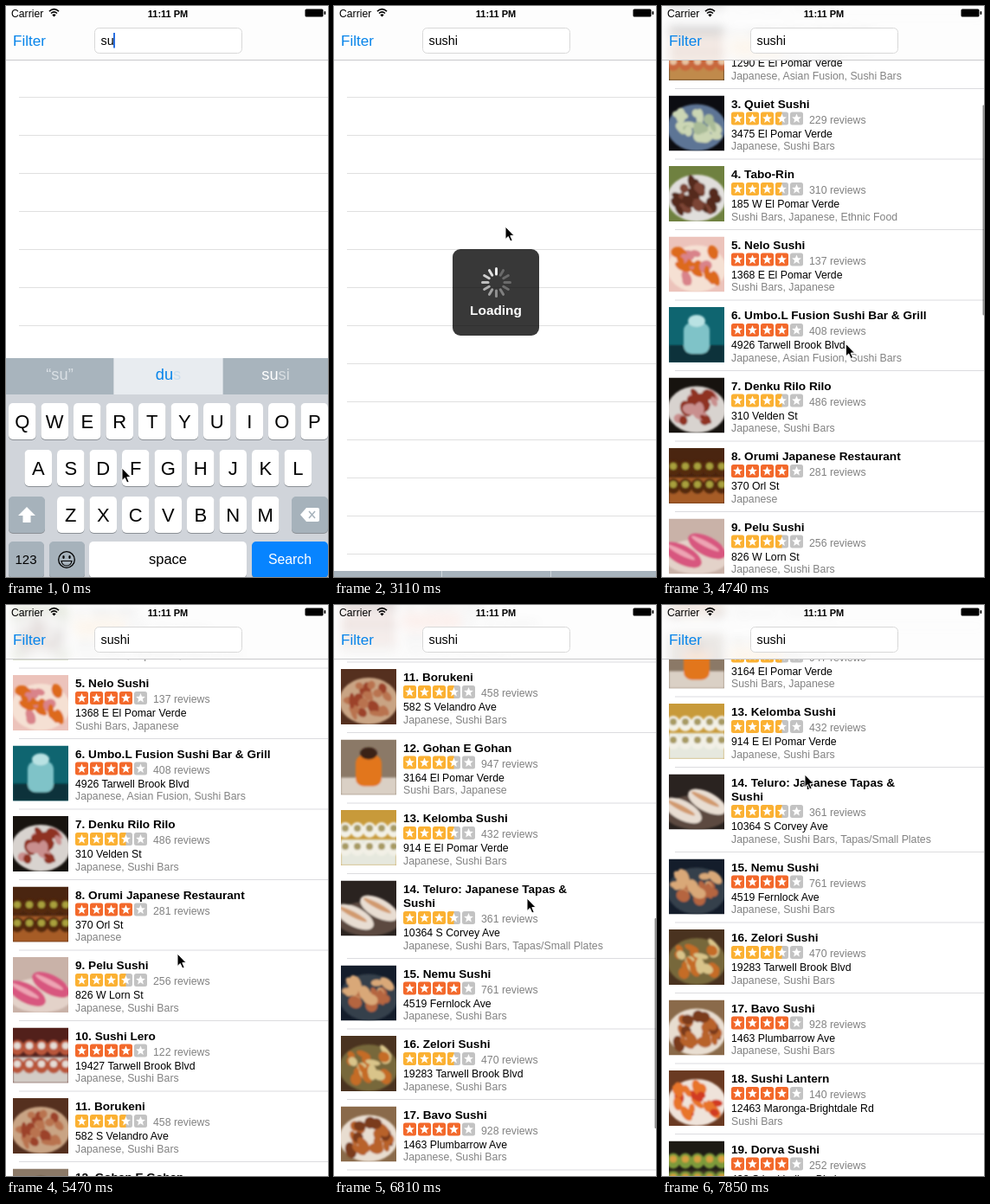
Animation, 372 px wide and 660 px high, one loop 7.99 s. Source, as an HTML page:

```html
<!DOCTYPE html>
<html lang="en">
<head>
<meta charset="utf-8">
<title>Sushi search</title>
<style>
html, body { margin: 0; width: 100%; height: 100%; overflow: hidden; background: #fff; }
svg { display: block; }
text { font-family: "Liberation Sans", Arial, sans-serif; white-space: pre; }
.title { font-size: 13.6px; font-weight: bold; }
.body { font-size: 12.3px; }
.gray { fill: #828282; }
.mid { text-anchor: middle; }
.key { font-size: 22px; }
.hint { font-size: 18.3px; }
</style>
</head>
<body>
<svg id="stage" width="372" height="660" viewBox="0 0 372 660"></svg>
<script>
const LOOP = 7990, STEP = LOOP / 54;
const BLUE = '#0784ea', KEY_GRAY = '#a6b2bb';

// title (/ breaks the line) | stars | reviews | address | categories | photo layout | photo colours
const rows = `Sushi Nemu|4|1316|482 W Lorn St|Sushi Bars, Japanese|heap|#1c2a36 #31505c #e99c88 #f3dcd4
Amber Fern Sushi Club|3.5|1003|1290 E El Pomar Verde|Japanese, Asian Fusion, Sushi Bars|rolls|#1b1512 #c08a4c #c9683c #e8c3a0
Quiet Sushi|3.5|229|3475 El Pomar Verde|Japanese, Sushi Bars|heap|#0c0d12 #5d7595 #cbd6b4 #a9bb98
Tabo-Rin|3.5|310|185 W El Pomar Verde|Sushi Bars, Japanese, Ethnic Food|heap|#6f8140 #e0dedb #54291f #7b4434
Nelo Sushi|4|137|1368 E El Pomar Verde|Sushi Bars, Japanese|heap|#ecc3bb #f5e0d3 #dd6a1e #d9838a
Umbo.L Fusion Sushi Bar &amp; Grill|4|408|4926 Tarwell Brook Blvd|Japanese, Asian Fusion, Sushi Bars|tower|#0f6570 #08333b #7fc3c8 #b9e2e3
Denku Rilo Rilo|3.5|486|310 Velden St|Japanese, Sushi Bars|heap|#17130f #d8d3cf #8f3322 #c98f8e
Orumi Japanese Restaurant|4|281|370 Orl St|Japanese|rolls|#4a2510 #a65c28 #552a10 #a9a13c
Pelu Sushi|3.5|256|826 W Lorn St|Japanese, Sushi Bars|slabs|#c9b2a8 #e3d2c9 #d8577f #eda4b4
Sushi Lero|4|122|19427 Tarwell Brook Blvd|Japanese, Sushi Bars|rolls|#52201b #d3ccc6 #b9563a #e5ddd6
Borukeni|3.5|458|582 S Velandro Ave|Japanese, Sushi Bars|heap|#55301f #c9a484 #b9734f #9c4229
Gohan E Gohan|3.5|947|3164 El Pomar Verde|Sushi Bars, Japanese|tower|#8b7967 #dad0c5 #e2761f #3a2418
Kelomba Sushi|3.5|432|914 E El Pomar Verde|Japanese, Sushi Bars|rolls|#c89a3a #e6e8de #f2f0e6 #a79a62
Teluro: Japanese Tapas &amp;/Sushi|3.5|361|10364 S Corvey Ave|Japanese, Sushi Bars, Tapas/Small Plates|slabs|#2a2320 #5b4a40 #e8ddd2 #d19a6e
Nemu Sushi|4|761|4519 Fernlock Ave|Japanese, Sushi Bars|heap|#141d2b #34404c #d9a878 #b5653f
Zelori Sushi|3.5|470|19283 Tarwell Brook Blvd|Japanese, Sushi Bars|heap|#4a3320 #77683a #c56c27 #d9c48a
Bavo Sushi|4|928|1463 Plumbarrow Ave|Japanese, Sushi Bars|heap|#8a6a4a #e8ddd0 #b8622a #7a3a1c
Sushi Lantern|4|140|12463 Maronga-Brightdale Rd|Sushi Bars|heap|#6a3a22 #efe3da #e8742a #d13a22
Dorva Sushi|4|252|428 S Larkhollow Blvd|Japanese, Sushi Bars|rolls|#1d1a14 #3d3524 #7d9a3a #d8a040`
  .split('\n').map(line => line.split('|'));

const range = n => [...Array(n).keys()];
const clamp = v => Math.max(0, Math.min(1, v));
const progress = (t, from, to) => clamp((t - from) / (to - from));
const text = (x, y, str, cls = '', attrs = '') => `<text x="${x}" y="${y}" class="${cls}" ${attrs}>${str}</text>`;
const rect = (x, y, w, h, fill, rx = 0, attrs = '') =>
  `<rect x="${x}" y="${y}" width="${w}" height="${h}" fill="${fill}" rx="${rx}" ${attrs}/>`;
const ellipse = (x, y, rx, ry, fill, turn = 0) =>
  `<ellipse cx="${x}" cy="${y}" rx="${rx}" ry="${ry}" fill="${fill}" transform="rotate(${turn} ${x} ${y})"/>`;
const path = (d, fill, attrs = '') => `<path d="${d}" fill="${fill}" ${attrs}/>`;

function random(seed) {
  return () => (seed = (seed * 16807) % 2147483647) / 2147483647;
}

const layouts = {
  heap: ([, a, b, c], rnd) => ellipse(32, 37, 34, 27, a) + range(22).map(i =>
    ellipse(9 + rnd() * 46, 18 + rnd() * 34, 4 + rnd() * 6, 3 + rnd() * 4, i % 3 ? b : c, rnd() * 90)).join(''),
  rolls: ([, a, b, c]) => rect(0, 34, 64, 30, a) + range(10).map(i => {
    const x = 5 + (i % 5) * 14, y = 23 + Math.floor(i / 5) * 21;
    return ellipse(x, y, 8, 9, b) + ellipse(x, y - 2, 4, 4, c);
  }).join(''),
  slabs: ([, a, b, c]) => ellipse(32, 44, 38, 20, a) + [[16, 42], [44, 32]].map(([x, y]) =>
    ellipse(x, y, 24, 11, b, 28) + ellipse(x - 2, y - 3, 18, 3, c, 28)).join(''),
  tower: ([, a, b, c]) => rect(0, 44, 64, 20, a) + rect(17, 18, 30, 36, b, 9) + ellipse(32, 16, 10, 7, c)
};

function photo(index, kind, colors) {
  const rnd = random(index * 7919 + 101);
  return `<svg x="8" y="8" width="64" height="64">${rect(0, 0, 64, 64, colors[0])}` +
    `<g filter="url(#soft)">${layouts[kind](colors, rnd)}</g></svg>`;
}

const starPath = range(10).map(i => {
  const r = i % 2 ? 2.5 : 5.7, a = i * Math.PI / 5;
  return `${i ? 'L' : 'M'}${(7.5 + r * Math.sin(a)).toFixed(2)} ${(7.8 - r * Math.cos(a)).toFixed(2)}`;
}).join('') + 'Z';

function stars(score, y) {
  const color = score === 4 ? '#f3692b' : '#fbb133';
  return range(5).map(i => `<g transform="translate(${80 + i * 17} ${y})">` +
    rect(0, 0, 15, 15, i + 1 <= score ? color : '#c3c3c3', 2.5) +
    (score - i === .5 ? path('M7.5 0H2.5Q0 0 0 2.5V12.5Q0 15 2.5 15H7.5Z', color) : '') +
    path(starPath, '#fff') + '</g>').join('');
}

function listMarkup() {
  let top = 62;
  return rows.map(([title, score, reviews, address, kinds, layout, colors], i) => {
    const lines = title.split('/'), dy = (lines.length - 1) * 16.5;
    const group = `<g transform="translate(0 ${top})">` + photo(i, layout, colors.split(' ')) +
      lines.map((line, n) => text(80, 22 + n * 16, (n ? '' : `${i + 1}. `) + line, 'title')).join('') +
      stars(+score, 27 + dy) +
      text(170, 40 + dy, `${reviews} reviews`, 'body gray') +
      text(80, 56 + dy, address, 'body') +
      text(80, 70.5 + dy, kinds, 'body gray') +
      rect(15, 81 + dy, 357, 1, '#dcdcdf') + '</g>';
    top += 81.5 + dy;
    return group;
  }).join('');
}

function navMarkup() {
  return rect(0, 0, 372, 62, '#fdfdfd') +
    '<g clip-path="url(#navArea)"><g filter="url(#frost)" opacity=".16"><use href="#list"/></g></g>' +
    rect(0, 62, 372, 1, '#c9c9cb') +
    text(6, 12.5, 'Carrier', '', 'font-size="12.2"') +
    text(187, 12.5, '11:11 PM', 'mid', 'font-size="11" font-weight="bold"') +
    path('M50 6.2Q55.5 1 61 6.2M52 8.5Q55.5 5.3 59 8.5', 'none', 'stroke="#000" stroke-width="1.6"') +
    path('M53.3 10.2Q55.5 8.3 57.7 10.2L55.5 12.5Z', '#000') +
    rect(345.5, 3.5, 21, 9, '#000', 1.5) + rect(367.5, 6, 1.8, 4, '#000', 1) +
    text(8, 46, 'Filter', '', `font-size="17.1" fill="${BLUE}"`) +
    rect(102.5, 25.5, 170, 29, '#fff', 5, 'stroke="#d8d8d8"') +
    text(109.5, 45, '', '', 'id="query" font-size="14.3"') +
    rect(124, 31, 2, 17.5, '#2a6fe0', 0, 'id="caret"');
}

function keyBox(x, y, w, fill = '#fff') {
  return rect(x, y + 1, w, 42, '#8b9096', 5) + rect(x, y, w, 42, fill, 5);
}

function keyboardMarkup() {
  const letters = [['QWERTYUIOP', 3, 459], ['ASDFGHJKL', 21.5, 513], ['ZXCVBNM', 59, 567]].map(([keys, x0, y]) =>
    [...keys].map((k, i) => keyBox(x0 + i * 37.5, y, 31.5) +
      text(x0 + i * 37.5 + 15.75, y + 29, k, 'key mid')).join('')).join('');
  return rect(0, 407, 372, 253, '#d0d4da') + rect(0, 407, 372, 42, '#a8b4bd') +
    rect(124, 407, 127, 42, '#e8ecf0', 0, 'id="highlight"') +
    rect(124, 407, 1, 42, '#d0d7dc') + rect(250, 407, 1, 42, '#d0d7dc') +
    text(62, 432, '', 'hint mid', 'id="hint0" fill="#d9dfe4"') +
    text(187.5, 432, '', 'hint mid', `id="hint1" fill="${BLUE}"`) +
    text(311.5, 432, '', 'hint mid', 'id="hint2" fill="#fff"') + letters +
    keyBox(3, 567, 42, KEY_GRAY) + path('M24 579L34 589H28.5V597H19.5V589H14Z', '#fff') +
    keyBox(330, 567, 42, KEY_GRAY) +
    path('M340 588L347 580H360Q362 580 362 582V594Q362 596 360 596H347Z', '#fff') +
    path('M350 584L357 592M357 584L350 592', 'none', `stroke="${KEY_GRAY}" stroke-width="1.5"`) +
    keyBox(3, 619, 41, KEY_GRAY) + text(23, 645, '123', 'mid', 'font-size="15"') +
    keyBox(50, 619, 41, KEY_GRAY) +
    '<circle cx="70" cy="640" r="9.3" fill="none" stroke="#000" stroke-width="1.3"/>' +
    ellipse(66.5, 637, 1.2, 2, '#000') + ellipse(73.5, 637, 1.2, 2, '#000') +
    path('M64 641.5H76Q75 647 70 647T64 641.5Z', 'none', 'stroke="#000" stroke-width="1.2"') +
    keyBox(96, 619, 182) + text(187, 645, 'space', 'mid', 'font-size="16.5"') +
    keyBox(284, 619, 88, '#0784ff') + text(328, 645, 'Search', 'mid', 'font-size="15.8" fill="#fff"');
}

function hudMarkup() {
  return rect(137, 281, 100, 100, '#000', 9, 'opacity=".78"') +
    range(12).map(i => rect(186, 302, 3, 9.5, '#fff', 1.5, `class="spoke" transform="rotate(${i * 30} 187.5 319.5)"`)).join('') +
    text(187, 357, 'Loading', 'mid', 'font-size="15.4" font-weight="bold" fill="#fff"');
}

const defs = `<defs><clipPath id="navArea">${rect(0, 0, 372, 62, '#000')}</clipPath>
  <filter id="frost" filterUnits="userSpaceOnUse" x="-30" y="-30" width="432" height="122"><feGaussianBlur stdDeviation="6"/></filter>
  <filter id="soft"><feGaussianBlur stdDeviation=".9"/></filter></defs>`;

document.getElementById('stage').innerHTML = defs + rect(0, 0, 372, 660, '#fff') +
  `<g id="empty">${range(13).map(i => rect(15, 105 + i * 44, 357, 1, '#e0e0e0')).join('')}</g>` +
  `<g id="list">${listMarkup()}</g><g>${navMarkup()}</g>` +
  rect(370.5, 0, 3, 243, '#000', 1, 'id="bar"') +
  `<g id="hud">${hudMarkup()}</g><g id="keyboard">${keyboardMarkup()}</g><g id="pointer">` +
  path('M0 0V14.5L3.3 11.5 5.8 17 8.2 16 5.8 10.6H10.2Z', '#000', 'stroke="#fff" stroke-width="1"') + '</g>';

const $ = id => document.getElementById(id);
const spokes = document.querySelectorAll('.spoke');

// start time, query, caret x, suggestions as [settled, fading in]
const typing = [
  [0, 'su', 124, ['“su”', ''], ['du', 's'], ['su', 'si']],
  [440, 'sus', 131, ['“sus”', ''], ['us', ''], ['susi', '']],
  [740, 'sush', 139, ['“sush”', ''], ['such', ''], ['sushi', '']],
  [1030, 'sushi', 142, ['“sushi”', ''], ['', ''], ['', '']]
];

const pointerPath = [
  [0, 134, 534], [1190, 136, 541], [1780, 163, 253], [2370, 352, 553], [2560, 340, 630], [2680, 340, 630],
  [3110, 198, 255], [3600, 203, 285], [4295, 219, 452], [4650, 217, 455], [4850, 206, 300], [5478, 198, 403],
  [5600, 202, 415], [5850, 214, 250], [6050, 218, 265], [6360, 223, 357], [6514, 223, 357], [6810, 223, 339],
  [7350, 222, 222], [7702, 203, 224], [7846, 165, 196]
];

// from, to, distance, easing power
const scrolls = [[4650, 5200, 315, 3], [5600, 5950, 477, 2], [6540, 6810, 19, 1], [6810, 7350, 123, 2]];

function pointerAt(t) {
  const next = pointerPath.findIndex(p => p[0] > t);
  if (next < 0) return pointerPath.at(-1).slice(1);
  const [a, b] = [pointerPath[next - 1], pointerPath[next]];
  const p = progress(t, a[0], b[0]), eased = p * p * (3 - 2 * p);
  return [1, 2].map(k => a[k] + (b[k] - a[k]) * eased);
}

const scrollAt = t => Math.round(2 * scrolls.reduce((sum, [from, to, distance, power]) =>
  sum + distance * (1 - (1 - progress(t, from, to)) ** power), 0)) / 2;

const barAt = t => Math.max(...scrolls.map(([from, to]) => t < from ? 0 : 1 - progress(t, to + 20, to + 260)));

function render(t) {
  const [, query, caretX, ...hints] = typing.findLast(s => s[0] <= t);
  $('query').textContent = query;
  $('caret').setAttribute('x', caretX);
  $('caret').setAttribute('opacity', t < 2700 ? 1 : 0);
  hints.forEach(([head, tail], i) => {
    const opacity = Math.max([1, .13, .55][i], progress(t, 0, 150));
    $('hint' + i).innerHTML = head + (tail && `<tspan fill-opacity="${opacity}">${tail}</tspan>`);
  });
  $('highlight').setAttribute('opacity', hints[1][0] ? 1 : 0);

  const slide = 260 * (1 - (1 - progress(t, 2790, 3306)) ** 3);
  $('keyboard').setAttribute('transform', `translate(0 ${slide})`);

  $('hud').setAttribute('opacity', progress(t, 2780, 2980) * (1 - progress(t, 3750, 3960)));
  const head = Math.floor((t - 3110) * 12 / 1000);
  spokes.forEach((spoke, i) => {
    const age = (((head - i) % 12) + 12) % 12;
    spoke.setAttribute('opacity', Math.max(.25, .92 - age * .08));
  });

  const loaded = t >= 3840, offset = scrollAt(t);
  $('empty').style.display = loaded ? 'none' : '';
  $('list').style.display = loaded ? '' : 'none';
  $('list').setAttribute('transform', `translate(0 ${-offset})`);
  $('bar').setAttribute('y', 362 + (offset - 811) * .363);
  $('bar').setAttribute('opacity', barAt(t) * .45);
  $('pointer').setAttribute('transform', `translate(${pointerAt(t)})`);
}

// The screen advances in even steps, so time is held between them.
const start = performance.now();
function tick() {
  const t = (performance.now() - start) % LOOP;
  render(Math.min(53, Math.floor((t + 6) / STEP)) * STEP + 4);
  requestAnimationFrame(tick);
}
tick();
</script>
</body>
</html>
```
